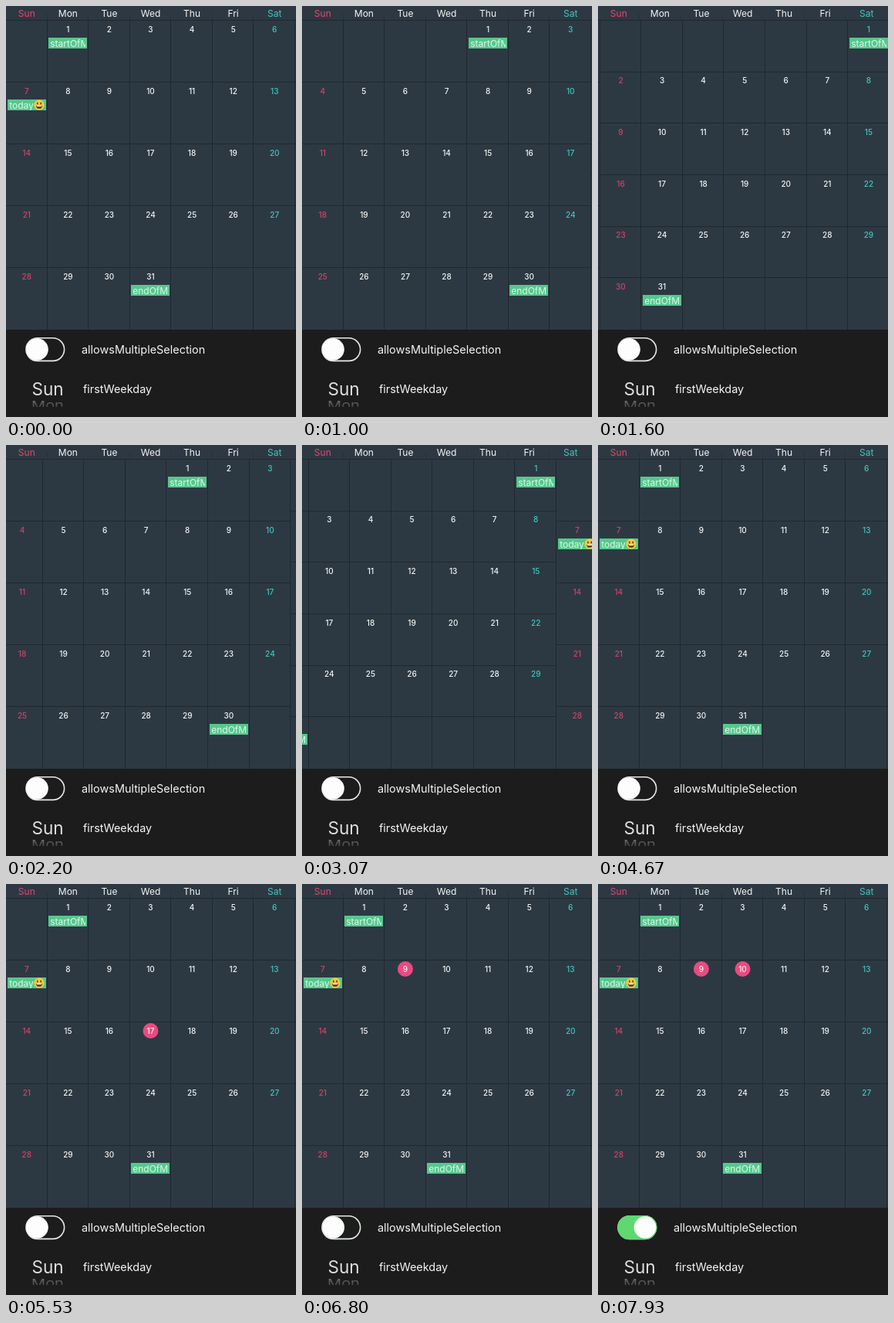
Write an HTML page with a canvas that moves like this. It is 376x532 px and loops after 8000 ms.

```html
<!DOCTYPE html>
<html lang="en">
<head>
<meta charset="utf-8">
<title>Calendar</title>
<style>
html, body { margin: 0; width: 100%; height: 100%; overflow: hidden; background: #1c1c1c; }
canvas { display: block; width: 376px; height: 532px; }
</style>
</head>
<body>
<canvas id="stage"></canvas>
<script>
const W = 376, H = 532, LOOP = 8000;
const TOP = 19, BOTTOM = 419, PAGE = 375, COL = PAGE / 7;
const FONT = 'Inter, Roboto, sans-serif';
const C = {
  panel: '#1c1c1c', grid: '#2d3942', head: '#2e3842', line: '#1f2830',
  pink: '#d2426c', headPink: '#e0486f', teal: '#3fc8c0', white: '#f4f6f7',
  event: '#55c88d', eventText: '#def7e9', mark: '#ea4a80', on: '#5fd872'
};
const WEEK = ['Sun', 'Mon', 'Tue', 'Wed', 'Thu', 'Fri', 'Sat'];

// Page number -> first weekday, day count, row count
const MONTHS = {
  '-1': { first: 6, days: 30, rows: 6 },
  '0': { first: 1, days: 31, rows: 5, today: 7 },
  '1': { first: 4, days: 30, rows: 5 },
  '2': { first: 6, days: 31, rows: 6 }
};

// Swipes: start, duration, from page, to page
const SWIPES = [
  [250, 650, 0, 1], [1046, 640, 1, 2], [1788, 500, 2, 1],
  [2330, 440, 1, 0], [2804, 420, 0, -1], [3270, 420, -1, 0]
];

// Selected days: day, from, until
const PICKS = [[17, 4700, 6100], [9, 6100, LOOP], [10, 7500, LOOP]];
const TOGGLE = 6800;

const canvas = document.getElementById('stage');
const ctx = canvas.getContext('2d');
const ratio = window.devicePixelRatio || 1;
canvas.width = W * ratio;
canvas.height = H * ratio;

const clamp = v => Math.max(0, Math.min(1, v));
const swipeEase = p => 1 - Math.pow(1 - Math.pow(p, 1.5), 3);
const outCubic = p => 1 - Math.pow(1 - p, 3);

function text(str, x, y, size, color, align = 'left', weight = 400) {
  ctx.font = `${weight} ${size}px ${FONT}`;
  ctx.textAlign = align;
  ctx.fillStyle = color;
  ctx.fillText(str, x, y);
}

function rect(x, y, w, h, color) {
  ctx.fillStyle = color;
  ctx.fillRect(x, y, w, h);
}

function disc(x, y, r, color) {
  ctx.fillStyle = color;
  ctx.beginPath();
  ctx.arc(x, y, r, 0, Math.PI * 2);
  ctx.fill();
}

function clipped(x, y, w, h, draw) {
  ctx.save();
  ctx.beginPath();
  ctx.rect(x, y, w, h);
  ctx.clip();
  draw();
  ctx.restore();
}

function pagePosition(t) {
  let pos = 0;
  for (const [start, span, from, to] of SWIPES) {
    if (t >= start) pos = from + (to - from) * swipeEase(clamp((t - start) / span));
  }
  return pos;
}

function smiley(x, y) {
  disc(x, y, 6.6, '#f8c93c');
  ctx.fillStyle = '#5d3b16';
  for (const side of [-2.2, 2.2]) {
    ctx.beginPath();
    ctx.ellipse(x + side, y - 2, 0.9, 1.5, 0, 0, Math.PI * 2);
    ctx.fill();
  }
  ctx.beginPath();
  ctx.arc(x, y + 0.9, 3.9, 0, Math.PI);
  ctx.fill();
  rect(x - 3, y + 1, 6, 1.1, '#fff');
}

function eventBar(x, y, label, face) {
  const left = Math.round(x + 1.5), top = Math.round(y);
  rect(left, top, 50, 14, C.event);
  clipped(left + 2, top, 46, 14, () => text(label, left + 2.2, top + 11.6, 12, C.eventText));
  if (face) smiley(left + 41, top + 7);
}

function drawMonth(page, left, t) {
  const m = MONTHS[page];
  const rowH = (BOTTOM - TOP) / m.rows;
  for (let r = 1; r < m.rows; r++) rect(left, Math.round(TOP + r * rowH) - 1, PAGE, 1, C.line);
  for (let c = 1; c <= 7; c++) rect(Math.round(left + c * COL) - 1, TOP, 1, BOTTOM - TOP, C.line);

  for (let day = 1; day <= m.days; day++) {
    const cell = m.first + day - 1, col = cell % 7;
    const x = left + col * COL, y = TOP + Math.floor(cell / 7) * rowH;
    const cx = x + COL / 2, cy = y + 11;
    let color = col === 0 ? C.pink : col === 6 ? C.teal : C.white;
    const pick = page === 0 && PICKS.find(p => p[0] === day && t >= p[1] && t < p[2]);
    if (pick) {
      disc(cx, cy, 10 * outCubic(clamp((t - pick[1]) / 160)), C.mark);
      color = C.white;
    }
    text(day, cx, cy + 3.6, 10, color, 'center', 500);
    if (day === 1) eventBar(x, y + 22, 'startOfMonth');
    if (day === m.days) eventBar(x, y + 22, 'endOfMonth');
    if (day === m.today) eventBar(x, y + 22, 'today', true);
  }
}

function drawCalendar(t) {
  rect(0, 0, W, BOTTOM, C.grid);
  const pos = pagePosition(t);
  clipped(0, TOP, W, BOTTOM - TOP, () => {
    for (let page = -1; page <= 2; page++) {
      const left = (page - pos) * PAGE;
      if (Math.abs(left) < W) drawMonth(page, left, t);
    }
  });
  rect(0, 0, W, TOP, C.head);
  rect(0, TOP - 1, W, 1, C.line);
  WEEK.forEach((name, i) => {
    const color = i === 0 ? C.headPink : i === 6 ? C.teal : C.white;
    if (i) rect(Math.round(i * COL) - 1, 10, 1, 8, '#27313a');
    text(name, (i + 0.5) * COL, 13.6, 12, color, 'center');
  });
}

function drawSwitch(t) {
  const k = outCubic(clamp((t - TOGGLE) / 260));
  ctx.beginPath();
  ctx.roundRect(26, 429.8, 49.6, 29.6, 14.8);
  ctx.lineWidth = 1.6;
  ctx.strokeStyle = '#e9e9e9';
  ctx.stroke();
  ctx.globalAlpha = k;
  ctx.fillStyle = ctx.strokeStyle = C.on;
  ctx.fill();
  ctx.stroke();
  ctx.globalAlpha = 1;
  disc(40.5 + 20.5 * k, 444.5, 14.3, '#fdfdfd');
}

function drawPanel(t) {
  rect(0, BOTTOM, W, H - BOTTOM, C.panel);
  drawSwitch(t);
  text('allowsMultipleSelection', 98, 450, 14.43, '#f5f5f5');
  text('firstWeekday', 100, 500.5, 14.43, '#f5f5f5');
  text('Sun', 54, 503.5, 22.6, '#dedede', 'center');

  // Next picker row, foreshortened and faded
  clipped(20, 508, 70, 11, () => {
    const shade = ctx.createLinearGradient(0, 510, 0, 519);
    shade.addColorStop(0, 'rgba(28,28,28,0)');
    shade.addColorStop(1, 'rgba(28,28,28,0.5)');
    ctx.save();
    ctx.translate(54, 522);
    ctx.scale(1, 0.75);
    text('Mon', 0, 0, 20, '#707070', 'center');
    ctx.restore();
    rect(20, 508, 70, 11, shade);
  });
}

function frame(now) {
  const t = now % LOOP;
  ctx.setTransform(ratio, 0, 0, ratio, 0, 0);
  drawCalendar(t);
  drawPanel(t);
  requestAnimationFrame(frame);
}
requestAnimationFrame(frame);
</script>
</body>
</html>
```
